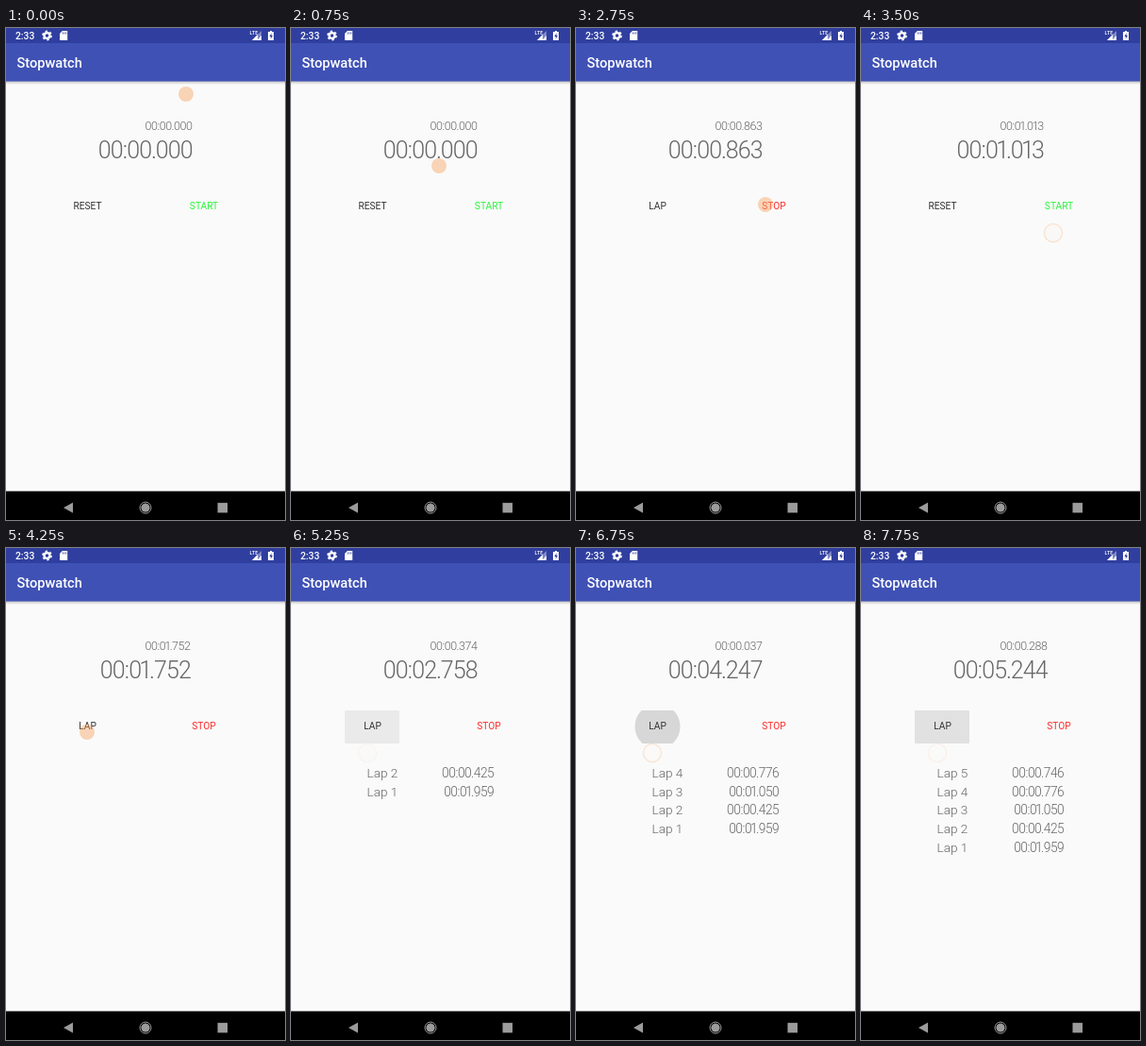
Animation, 296 px wide and 521 px high, one loop 8 s. Source, as an HTML page:

```html
<!DOCTYPE html>
<html lang="en">
<head>
<meta charset="utf-8">
<title>Stopwatch</title>
<style>
html, body { margin: 0; width: 100%; height: 100%; overflow: hidden; background: #fafafa; }
svg { display: block; width: 296px; height: 521px; }
text { font-family: Roboto, "Open Sans", sans-serif; }
.thin { font-weight: 300; fill: #666; }
.digits, .button { text-anchor: middle; }
.button { font-size: 10.2px; }
</style>
</head>
<body>
<svg viewBox="0 0 296 521">
  <defs>
    <linearGradient id="shade" x1="0" y1="0" x2="0" y2="1">
      <stop offset="0" stop-color="#000" stop-opacity=".24"/>
      <stop offset="1" stop-color="#000" stop-opacity="0"/>
    </linearGradient>
    <clipPath id="leftBox"><rect x="57" y="172" width="58" height="35" rx="1"/></clipPath>
    <clipPath id="rightBox"><rect x="181" y="172" width="58" height="35" rx="1"/></clipPath>
  </defs>
  <rect width="296" height="521" fill="#fafafa"/>
  <rect y="56" width="296" height="4" fill="url(#shade)"/>
  <rect width="296" height="56.5" fill="#3f51b5"/>
  <rect width="296" height="16" fill="#303f9f"/>

  <g fill="#fff">
    <text x="10" y="11.6" font-size="10.3" font-weight="500">2:33</text>
    <g transform="translate(43.5 8)">
      <circle r="2.9" fill="none" stroke="#fff" stroke-width="2.4"/>
      <circle r="4.5" fill="none" stroke="#fff" stroke-width="1.8" stroke-dasharray="2.3 2.412"/>
    </g>
    <path d="M59.8 3h5.4v10h-8.2V6z"/>
    <path d="M60.2 4.5v2M62 4.5v2M63.8 4.5v2" stroke="#303f9f" stroke-width=".8"/>
    <text x="258.5" y="7.4" font-size="5.4" font-weight="500">LTE</text>
    <path d="M271 3v10h-10z" opacity=".4"/>
    <path d="M267 7v6h-6z"/>
    <path d="M271 8v5h-4.5z"/>
    <path d="M280 3h2v1h2v9h-6V4h2z"/>
    <path d="M281.6 5.5l-2.2 3.6h1.4v2.4l2.2-3.6h-1.4z" fill="#303f9f"/>
    <text x="11.5" y="42" font-size="14.6" font-weight="500">Stopwatch</text>
  </g>

  <g id="leftRipple" clip-path="url(#leftBox)"><circle cx="86.5" cy="189"/></g>
  <g id="rightRipple" clip-path="url(#rightBox)"><circle cx="210" cy="189"/></g>

  <text id="lapTime" class="thin digits" y="108.3"/>
  <text id="total" class="thin digits" y="138"/>
  <text id="leftLabel" class="button" x="86.5" y="192" fill="#333"/>
  <text id="rightLabel" class="button" x="210" y="192"/>
  <g id="laps"></g>

  <circle id="ring" r="9.6" fill="#f6a868" fill-opacity=".06" stroke="#f6a868" stroke-width="1.4"/>
  <circle id="dot" r="8" fill="#f5a25d" opacity=".44"/>

  <rect y="490.5" width="296" height="30.5" fill="#000"/>
  <g fill="#9b9b9b">
    <path d="M71 502.5v11l-10-5.5z"/>
    <circle cx="148" cy="508" r="4.6"/>
    <circle cx="148" cy="508" r="6" fill="none" stroke="#9b9b9b"/>
    <rect x="224.5" y="502.8" width="10.5" height="10.5"/>
  </g>
</svg>
<script>
const LOOP = 8000, STEP = 250;
const START = 1887, HALT = 2900, RESUME = 3515;
const LAPS = [1959, 425, 1050, 776, 746];
const $ = id => document.getElementById(id);

// time, elapsed
const CLOCK = [[START, 0], [HALT, 1013], [RESUME, 1013], [5250, 2758], [6750, 4247], [LOOP, 5493]];
// time, x, y; equal neighbours are rests
const POINTER = [[250, 191, 70], [750, 157, 146], [1250, 200, 217], [1750, 204, 207], [2250, 204, 207],
  [2750, 201, 187], [3200, 204, 217], [3600, 204, 217], [4250, 86, 195], [4450, 81, 217], [LOOP, 81, 217]];

function segment(keys, t) {
  let i = 1;
  while (i < keys.length - 1 && t >= keys[i][0]) i++;
  return [keys[i - 1], keys[i]];
}

function sample(keys, t) {
  const [a, b] = segment(keys, t);
  const k = Math.max(0, Math.min(1, (t - a[0]) / (b[0] - a[0])));
  return a.slice(1).map((v, j) => v + (b[j + 1] - v) * k);
}

function format(ms) {
  const pad = (n, w) => String(n).padStart(w, "0");
  ms = Math.round(ms);
  return pad(Math.floor(ms / 60000), 2) + ":" + pad(Math.floor(ms / 1000) % 60, 2) + "." + pad(ms % 1000, 3);
}

// narrow separators and ones
const advance = c => ":.".includes(c) ? 0.18 : c === "1" ? 0.37 : 0.52;
const widthOf = (str, size) => [...str].reduce((w, c) => w + advance(c) * size, 0);

function setDigits(el, str, size, right) {
  let x = right - widthOf(str, size);
  const xs = [...str].map(c => {
    const w = advance(c) * size;
    x += w;
    return (x - w / 2).toFixed(2);
  });
  el.setAttribute("font-size", size);
  el.setAttribute("x", xs.join(" "));
  el.textContent = str;
}

function addText(cls, y) {
  const el = document.createElementNS("http://www.w3.org/2000/svg", "text");
  el.setAttribute("class", cls);
  el.setAttribute("y", y);
  $("laps").append(el);
  return el;
}

const rows = LAPS.map((_, i) => {
  const y = 243 + i * 19.7;
  const name = addText("thin", y);
  name.setAttribute("x", 80.5);
  name.setAttribute("font-size", 13.6);
  return { name, time: addText("thin digits", y) };
});

function setRipple(id, age) {
  const circle = $(id).firstElementChild;
  circle.setAttribute("r", 18.5 + Math.min(age, 140) * 0.15);
  circle.setAttribute("opacity", Math.max(0, Math.min(0.14, (520 - age) * 0.00044)));
}

function draw(t) {
  const [total] = sample(CLOCK, t);
  let count = 0, lapTime = total;
  while (count < LAPS.length && lapTime >= LAPS[count]) lapTime -= LAPS[count++];

  const text = format(total);
  const right = 148.2 + widthOf(text, 25) / 2;
  setDigits($("total"), text, 25, right);
  setDigits($("lapTime"), format(lapTime), 12.5, right - 0.5);

  const running = t >= START && t < HALT || t >= RESUME;
  $("leftLabel").textContent = running ? "LAP" : "RESET";
  $("rightLabel").textContent = running ? "STOP" : "START";
  $("rightLabel").setAttribute("fill", running ? "#ff2a2a" : "#2af53a");

  rows.forEach((row, i) => {
    const n = count - i;
    row.name.textContent = n > 0 ? "Lap " + n : "";
    if (n > 0) setDigits(row.time, format(LAPS[n - 1]), 13.8, 215.5);
    else row.time.textContent = "";
  });

  setRipple("leftRipple", count ? lapTime : LOOP);
  const click = [RESUME, HALT, START].find(c => t >= c) ?? -LOOP;
  setRipple("rightRipple", t - click);

  const [x, y] = sample(POINTER, t);
  const [a, b] = segment(POINTER, t);
  const resting = a[1] === b[1] && a[2] === b[2];
  for (const id of ["dot", "ring"]) {
    $(id).setAttribute("cx", x);
    $(id).setAttribute("cy", y);
  }
  $("dot").setAttribute("visibility", resting ? "hidden" : "visible");
  $("ring").setAttribute("visibility", resting ? "visible" : "hidden");
  $("ring").setAttribute("opacity", running ? Math.max(0.08, 0.28 - lapTime * 0.0006) : 0.28);
}

let origin;
function tick(now) {
  origin ??= now;
  const t = (now - origin) % LOOP;
  draw(Math.floor(t / STEP) * STEP);
  requestAnimationFrame(tick);
}
draw(0);
requestAnimationFrame(tick);
</script>
</body>
</html>
```
